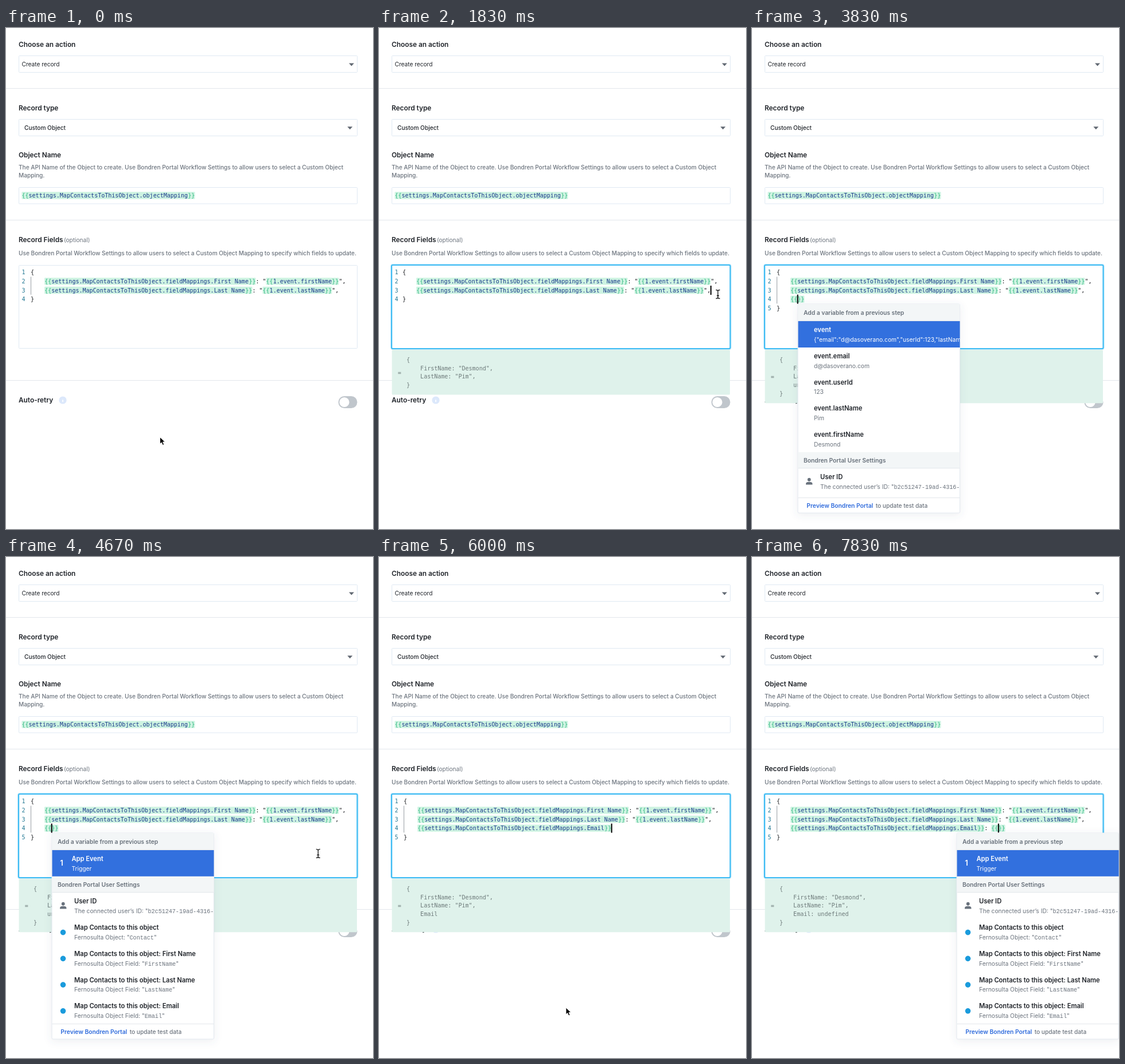
Recreate the animation shown at these times as an HTML page. Size 640 by 875 pixels, loop 8000 ms.

```html
<!DOCTYPE html>
<html lang="en">
<head>
<meta charset="utf-8">
<title>Record fields</title>
<style>
  html, body { margin: 0; width: 100%; height: 100%; overflow: hidden; background: #fff; }
  svg { display: block; width: 100%; height: 100%; }
  text { font-family: Inter, sans-serif; white-space: pre; }
  .h { font-size: 11.85px; font-weight: 600; fill: #1f2329; }
  .d { font-size: 10.12px; font-weight: 500; fill: #6b737d; }
  .v { font-size: 10.15px; fill: #1f2329; }
  .v.mid { font-weight: 500; }
  .o { font-size: 10.1px; fill: #6b737d; }
  .m { font: 10.03px "DejaVu Sans Mono", monospace; fill: #16191d; }
  .m.var { fill: #1b3a8c; }
  .m.brace { fill: #35b983; }
  .m.num { fill: #237893; }
  .m.out { fill: #6d7a7a; }
  .g { font-size: 10.28px; font-weight: 600; fill: #68717b; }
  .t { font-size: 11.13px; font-weight: 600; fill: #1f2329; }
  .s { font-size: 10.28px; fill: #6b737d; }
  .s tspan { font-family: "Liberation Mono", monospace; font-size: 10.08px; }
  .badge { font-size: 13px; font-weight: 600; }
  .on, .on tspan { fill: #fff; }
  .link { fill: #2f6bdc; }
</style>
</head>
<body>
<svg viewBox="0 0 640 875" preserveAspectRatio="xMinYMin meet">
  <defs>
    <clipPath id="code"><rect x="42" y="415" width="569" height="144"/></clipPath>
    <clipPath id="menu"><rect x=".5" width="282" height="380"/></clipPath>
    <filter id="shade" x="-15%" y="-15%" width="130%" height="130%">
      <feDropShadow dx="0" dy="3" stdDeviation="7" flood-color="#50607a" flood-opacity=".1"/>
    </filter>
  </defs>
  <g id="form"></g>
  <g id="live"></g>
</svg>
<script>
const LOOP = 8000, FPS = 6;
const CW = 6.038, LINE = 15.6, ROW = 45.75;
const PORTAL = 'Bondren Portal', CRM = 'Fernosulta';
const FIRST = 'Desmond', LAST = 'Pim', MAIL = 'd@dasoverano.com';
const SETTINGS = 'settings.MapContactsToThisObject.';
const $ = id => document.getElementById(id);

const text = (x, y, cls, str) => `<text x="${x}" y="${y}" class="${cls}">${str}</text>`;
const rect = (x, y, w, h, fill, more = '') =>
  `<rect x="${x}" y="${y}" width="${w}" height="${h}" fill="${fill}" ${more}/>`;
const rule = (x, y, w) => rect(x, y, w, 1, '#e3e7eb');
const box = (y, h) => rect(22.5, y, 590, h, '#fff', 'rx="1" stroke="#dfe9f3"');
const arrow = (x, y) => `<path d="M${x} ${y}h9l-4.5 5z" fill="#626973"/>`;

// Monospaced text with {{variables}} marked
function code(str, x, y) {
  let out = '', at = 0;
  const put = (s, cls) => {
    out += text(x + at * CW, y, 'm ' + cls, s);
    at += s.length;
  };
  for (const part of str.split(/(\{\{.*?\}\})/)) {
    if (!part) continue;
    if (!part.startsWith('{{')) { put(part, ''); continue; }
    out += rect(x + at * CW, y - 9.7, part.length * CW, 12.4, '#cdf3e1', 'rx="1"');
    put('{{', 'brace');
    if (part.length > 4) put(part.slice(2, -2), 'var');
    put('}}', 'brace');
  }
  return out;
}

function form() {
  const help = `Use ${PORTAL} Workflow Settings to allow users to select a Custom Object`;
  return rule(0, 105, 640) + rule(0, 335, 640) + rule(0, 615, 640) +
    text(22, 33, 'h', 'Choose an action') + box(48.5, 29) +
    text(27.5, 67, 'v', 'Create record') + arrow(598, 61.5) +
    text(22, 144, 'h', 'Record type') + box(159.5, 29) +
    text(32, 177.7, 'v mid', 'Custom Object') + arrow(595.3, 172.3) +
    text(22, 226, 'h', 'Object Name') +
    text(22, 247.3, 'd', `The API Name of the Object to create. ${help}`) +
    text(22, 261.2, 'd', 'Mapping.') + box(278.5, 28.5) +
    code(`{{${SETTINGS}objectMapping}}`, 27.5, 296) +
    text(22, 374, 'h', 'Record Fields') + text(101, 373.6, 'o', '(optional)') +
    text(22, 396.5, 'd', `${help} Mapping to specify which fields to update.`) +
    text(22, 654, 'h', 'Auto-retry') +
    '<circle cx="99" cy="650" r="6.6" fill="#dce8fb"/>' +
    '<path d="M99 647v.2M99 649.3v4" stroke="#fff" stroke-width="1.7"/>' +
    rect(579.5, 643, 33, 21, '#c0c6cc', 'rx="10.5"') +
    '<circle cx="590" cy="653.5" r="8.6" fill="#fff"/>';
}

// Fourth line by step: [step, source, caret column, evaluated]
const EMAIL = `{{${SETTINGS}fieldMappings.Email}}`, END = EMAIL.length;
const TYPING = [
  [13, '', 0, ''],
  [20, '{}', 1, '{}'],
  [22, '{{}}', 2, 'undefined'],
  [36, EMAIL, END, 'Email'],
  [39, EMAIL + ':', END + 1, 'Email:'],
  [41, EMAIL + ': ', END + 2, 'Email: '],
  [44, EMAIL + ': {}', END + 3, 'Email: {}'],
  [47, EMAIL + ': {{}}', END + 4, 'Email: undefined'],
];

function editor(step, typed) {
  const focus = step >= 9;
  const pair = (f, v) => `    {{${SETTINGS}fieldMappings.${f}}}: "{{1.event.${v}}}",`;
  const lines = ['{', pair('First Name', 'firstName'), pair('Last Name', 'lastName')];
  if (typed) lines.push('    ' + typed[1]);
  lines.push('}');
  const x = focus && !typed ? 41 : 43;
  const caretLine = typed ? 3 : 2;
  const caretX = x + (typed ? 4 + typed[2] : lines[2].length) * CW;
  const y = i => 430.3 + i * LINE;
  let body = rect(x, 434.5, 1, (lines.length - 2) * LINE, '#9a9fa5');
  body += lines.map((s, i) => code(s, x, y(i))).join('');
  if (focus) body += rect(caretX - .6, y(caretLine) - 11.5, 2, 16, '#000');
  return (focus
    ? rect(22, 414, 590.5, 146, '#fff', 'rx="2" stroke="#c3eafc" stroke-width="4"') +
      rect(22, 414, 590.5, 146, '#fff', 'rx="2" stroke="#3fbcf3" stroke-width="2.2"')
    : box(414.5, 145)) +
    lines.map((_, i) => text(27.5, y(i), 'm num', i + 1)).join('') +
    `<g clip-path="url(#code)">${body}</g>`;
}

function preview(typed) {
  const lines = ['{', `    FirstName: "${FIRST}",`, `    LastName: "${LAST}",`];
  if (typed) lines.push('    ' + typed[3]);
  lines.push('}');
  const bottom = typed ? 655.3 : 640.5;
  return rect(22.5, 562, 589.5, bottom - 562, '#dff2eb', 'rx="1.5"') +
    text(32.8, typed ? 612.5 : 605.5, 'm out', '=') +
    lines.map((s, i) => text(48, 583.2 + i * 14.6, 'm out', s)).join('');
}

const person = y =>
  `<circle cx="19.7" cy="${y + 19.5}" r="2.9" fill="#69727d"/>` +
  `<path d="M14 ${y + 28.2}v-1.4q0-3.2 5.7-3.2t5.7 3.2v1.4z" fill="#69727d"/>`;
const dot = y => `<circle cx="19.5" cy="${y + 23.6}" r="4.8" fill="#1a9bdc"/>`;

function row(y, x, title, sub, on, icon = '') {
  const cls = on ? ' on' : '';
  return (on ? rect(0, y, 283, ROW, '#3270de', 'shape-rendering="crispEdges"') : '') + icon +
    text(x, y + 19.2, 't' + cls, title) + text(x, y + 35.9, 's' + cls, sub);
}

const header = (y, h, str) => rect(0, y, 283, h, '#f3f6f7') +
  rule(0, y + h - 1, 283) + text(10, y + h / 2 + 4, 'g', str);

function menu(x, expanded, mouse) {
  const quoted = s => `"<tspan>${s}</tspan>"`;
  const over = y => mouse && mouse.x > x && mouse.x < x + 283 &&
    mouse.y - 482 > y && mouse.y - 482 < y + ROW;
  let y = 30, out = header(0, 30, 'Add a variable from a previous step');
  const add = (tx, title, sub, icon, on) => {
    out += row(y, tx, title, sub, on || over(y), icon && icon(y));
    y += ROW;
  };
  if (expanded) {
    const all = `{"email":"${MAIL}","userId":123,"lastName":"${LAST}"}`;
    [['event', all], ['event.email', MAIL], ['event.userId', '123'],
     ['event.lastName', LAST], ['event.firstName', FIRST]]
      .forEach(([k, v], i) => add(28, k, v, null, i === 0));
  } else {
    add(34.5, 'App Event', 'Trigger', null, true);
    out += text(14.3, 57, 'badge on', '1');
  }
  out += header(y, 28.5, `${PORTAL} User Settings`);
  y += 28.5;
  add(39, 'User ID', 'The connected user’s ID: ' + quoted('b2c51247-19ad-4316-8'), person);
  if (expanded) {
    y += 5;
  } else {
    add(39, 'Map Contacts to this object', `${CRM} Object: ` + quoted('Contact'), dot);
    for (const f of ['First Name', 'Last Name', 'Email'])
      add(39, 'Map Contacts to this object: ' + f,
        `${CRM} Object Field: ` + quoted(f.replace(' ', '')), dot);
  }
  out += rule(0, y, 283) + text(15.3, y + 18, 'g link', 'Preview ' + PORTAL) +
    text(135.7, y + 17.6, 'd', 'to update test data');
  const h = y + 27;
  return `<g transform="translate(${x} 482)">` +
    rect(0, 0, 282.5, h, '#fff', 'rx="2" stroke="#e1e7ee" filter="url(#shade)"') +
    `<g clip-path="url(#menu)">${out}</g></g>`;
}

// Pointer legs: [from step, to step, x0, y0, x1, y1]
const LEGS = [
  [0, 8, 268.5, 714.5, 591, 465],
  [8, 13, 591, 465, 591, 465],
  [27, 31, 585, 470, 324.5, 777],
  [31, 36, 324.5, 777, 326, 787],
  [36, 38, 326, 787, 326, 787],
];

function pointer(step) {
  const leg = LEGS.find(l => step >= l[0] && step < l[1]);
  if (!leg) return null;
  const [a, b, x0, y0, x1, y1] = leg;
  const u = (step - a) / (b - a), k = u * u * (3 - 2 * u);
  return { x: x0 + (x1 - x0) * k, y: y0 + (y1 - y0) * k };
}

const SHAPES = {
  arrow: '<path d="M0 0v12l2.8-2.6 2 4.6 2.3-1-2-4.5h3.8z" fill="#000" stroke="#fff" stroke-width=".9"/>',
  beam: '<path d="M-3.5-7.5q3.5 0 3.5 2 0-2 3.5-2M0-5.5v11M-3.5 7.5q3.5 0 3.5-2 0 2 3.5 2M-2 2.5h4"' +
    ' fill="none" stroke="#111" stroke-width="1.3"/>',
  hand: '<path d="M-1.6.4Q-.2-1 1 .6l1.9 4 1-.8 1.6.7 1.2-.5 1.3.9 1.2 0 .7 4.4-1.4 4.5-5.6 1-4.4-4-1.9-3' +
    'q.2-1.5 2.2-.3l1 .8z" fill="#fff" stroke="#111" stroke-width="1.1" stroke-linejoin="round"/>',
};

function cursor(p, menuX) {
  const kind = menuX !== null && p.x > menuX && p.x < menuX + 283 && p.y > 482 ? 'hand'
    : p.y > 414 && p.y < 560 ? 'beam' : 'arrow';
  return `<g transform="translate(${p.x} ${p.y})">${SHAPES[kind]}</g>`;
}

function draw(step) {
  const typed = TYPING.filter(s => step >= s[0]).pop();
  const mouse = pointer(step);
  const menuX = step >= 47 ? 357 : step >= 22 && step < 36 ? 80 : null;
  const expanded = step >= 23 && step < 27;
  $('live').innerHTML =
    (step >= 9 ? preview(typed) : '') + editor(step, typed) +
    (menuX === null ? '' : menu(menuX, expanded, mouse)) +
    (mouse ? cursor(mouse, menuX) : '');
}

$('form').innerHTML = form();
const start = performance.now();
let shown = -1;
function tick() {
  const t = Math.max(0, performance.now() - start) % LOOP;
  const step = Math.floor((t + 5) * FPS / 1000) % (LOOP * FPS / 1000);
  if (step !== shown) draw(shown = step);
  requestAnimationFrame(tick);
}
tick();
</script>
</body>
</html>
```
